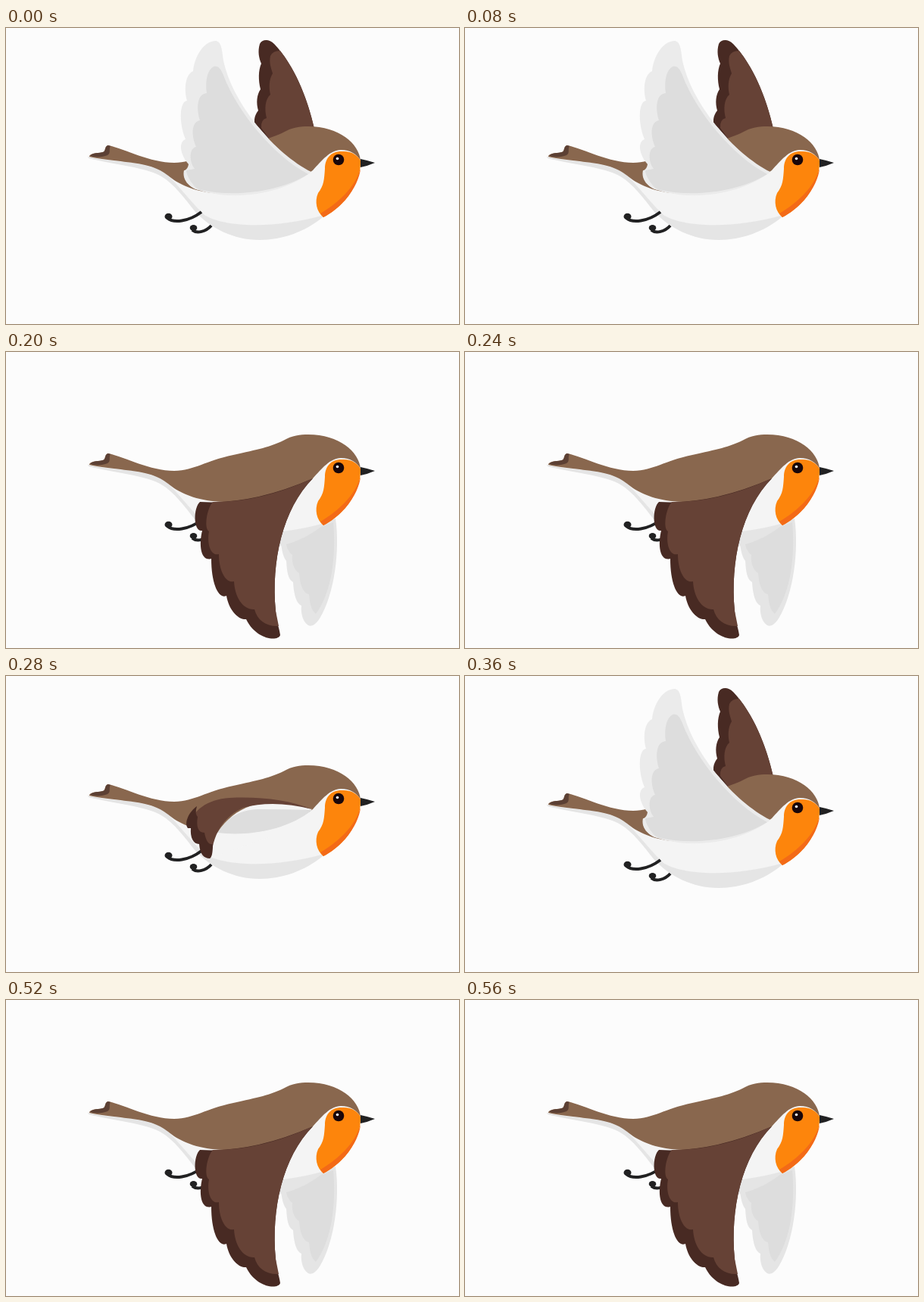
An HTML page with a canvas that plays this animation: 598x391 px, repeating every 600 ms.

```html
<!DOCTYPE html>
<html lang="en">
<head>
<meta charset="utf-8">
<title>Flying robin</title>
<style>
html, body { margin: 0; width: 100%; height: 100%; overflow: hidden; background: #fcfcfc; }
canvas { display: block; }
</style>
</head>
<body>
<canvas id="stage" width="598" height="391"></canvas>
<script>
const ctx = document.getElementById('stage').getContext('2d');

const color = {
  sky: '#fcfcfc', back: '#89674e', wing: '#664236', wingEdge: '#482a23',
  under: '#dddddd', underEdge: '#ebebeb', belly: '#f4f4f4', bellyShade: '#e5e5e5',
  breast: '#fd850c', breastShade: '#f36a17', ink: '#212122', eye: '#19060a'
};

const shape = (fill, d) => ({ fill, path: new Path2D(d) });

// Body parts, all relative to the highest point of the flight
const trunk = shape(color.bellyShade, `M108 149 C130 154 165 156 190 160 L300 170 L405 160
  L430 143 Q458 135 468 153 L468 165 C460 190 445 210 418 229 C395 248 365 259 335 259
  C300 259 270 243 250 222 C235 203 222 185 205 175 C185 163 140 159 109 151Z`);
const belly = shape(color.belly, `M200 162 C222 178 240 205 262 226 C285 241 350 246 420 226
  L470 180 L468 130 L300 150Z`);
const upper = [
  shape(color.back, `M110 148 C113 143 123 145 129 142.5 C132 140 130 135 135 134
    C158 139 190 157 222 157 C250 156 262 144 300 136 C332 129 350 125 366 117
    C378 110 388 109 399 109 C440 109 466 132 468 154 C463 146 455 140 442 140
    C428 140 417 154 405 167 C382 185 335 197 300 198 C262 199 240 191 222 180
    C206 168 200 162 170 157.5 C145 154 120 152 110 149Z`),
  shape('#5c4034', `M111 148 C114 143 123 145 129 142.5 C132 140 130 135 135 134 L138 135
    C135 139 139 144 134 147 C127 150 118 150 111 148Z`),
  shape(color.breast, `M421 165 C421 152 428 142 443 142 C456 141 464 147 468 154
    C469 172 460 192 448 206 C440 215 429 224 419 229 C410 222 407 208 412 197
    C420 187 420 178 421 165Z`),
  shape(color.breastShade, `M468 165 C460 190 440 209 415 224 L419 229
    C429 224 440 215 448 206 C460 192 467 176 468 165Z`),
  shape(color.ink, 'M468 152 Q478 154 487 157 Q478 161 468 163Z')
];
const legs = new Path2D('M213 230 C221 237 241 235 258 222 M246 246 C252 251 264 248 271 240');

const poses = {
  raised: {
    drop: 21,
    behind: [
      shape(color.wingEdge, `M407 133 C398 92 380 48 354 21 C347 14 338 15 335 21
        C332 31 334 40 337 47 C333 56 333 69 336 81 C331 88 330 99 333 109
        C327 117 328 122 328 125 L350 150Z`),
      shape(color.wing, `M407 133 C398 94 384 59 362 30 Q352 30 349 37 C347 46 350 53 352 60
        C347 68 347 79 349 88 C342 94 341 107 344 119 Q336 121 337 132 L350 150Z`)
    ],
    front: [
      shape(color.underEdge, `M403 190 C355 166 299 100 287 43 C285 27 284 17 276 17
        C261 18 249 37 247 57 C236 62 235 82 239 96 C229 97 228 125 237 147
        C228 150 229 166 241 180 Q240 186 236 188 C232 197 241 211 254 214
        C300 229 365 220 403 190Z`),
      shape(color.under, `M399 193 C353 169 306 111 288 65 C284 53 279 49 274 51
        C265 56 263 72 265 86 C252 87 251 106 256 122 C245 124 244 141 251 157
        C241 159 242 177 249 186 L238 188 C238 202 246 210 257 214
        C305 224 362 216 399 193Z`),
      shape(color.underEdge, 'M235 188 C232 200 242 211 254 214 Q242 204 237 188Z')
    ]
  },
  folding: {
    drop: 29.5,
    behind: [],
    front: [
      shape('#f0f0f0', `M240 189 C235 189 235 205 240 222 C252 245 275 251 302 251
        C333 250 351 244 369 231 L300 234 C272 228 250 213 244 194 Q242 189 240 189Z`),
      shape(color.under, `M239 223 C245 243 270 251 302 251 C330 250 348 244 365 234
        C330 239 290 239 262 230 Q250 225 253 235 Q245 232 239 223Z`),
      shape(color.wing, `M270 223 C315 226 362 219 405 197 C391 209 378 221 365 232
        C330 241 295 235 270 223Z`)
    ]
  },
  lowered: {
    drop: 0,
    behind: [
      shape(color.bellyShade, `M435 220 C441 260 434 320 414 352 C408 361 403 363 399 361
        C391 356 389 343 390 335 C384 333 380 322 379 304 C372 300 371 290 370 276
        C364 268 364 258 362 245Z`),
      shape(color.under, `M432 225 C436 270 430 318 409 346 C402 340 401 330 400 320
        C391 318 388 305 387 292 C379 288 377 275 378 268 Q370 262 369 248Z`)
    ],
    front: [
      shape(color.wingEdge, `M405 167 C365 208 350 276 356 342 C357 357 361 365 362 374
        C359 383 330 380 317 353 C306 354 294 340 291 322 C281 327 271 307 271 273
        C258 277 254 257 259 236 C247 238 247 206 256 198 Q325 202 405 167Z`),
      shape(color.wing, `M405 167 C365 208 350 276 356 342 L360 362 C344 363 332 355 328 340
        C313 341 302 324 301 303 C290 306 281 289 281 267 C270 270 265 253 268 237
        C261 233 265 207 273 198 Q335 199 405 167Z`)
    ]
  },
  rising: {
    drop: 9,
    behind: [],
    front: [
      shape(color.belly, 'M271 240 C272 200 305 170 345 167 Q378 167 404 176 L350 212Z'),
      shape(color.under, 'M279 207 C291 188 307 177 333 176 Q369 176 404 177 C371 204 319 212 279 207Z'),
      shape(color.wing, `M404 176 C373 163 333 159 295 161 C265 163 246 178 243 197
        L258 222 L271 238 C274 204 291 184 313 174 Q353 163 404 176Z`),
      shape(color.wingEdge, `M252 172 C241 180 235 194 240 201 L244 201 C243 213 247 222 255 222
        C256 235 261 241 269 241 Q273 239 273 222 Q265 224 262 207 C253 207 251 198 253 186
        Q249 182 252 172Z`)
    ]
  }
};

const wingbeat = [
  [0, 'raised'], [120, 'folding'], [200, 'lowered'], [280, 'rising'],
  [360, 'raised'], [440, 'folding'], [520, 'lowered']
];
const LOOP = 600;

function paint({ fill, path }) {
  ctx.fillStyle = fill;
  ctx.fill(path);
}

function ellipse(fill, x, y, rx, ry = rx) {
  ctx.fillStyle = fill;
  ctx.beginPath();
  ctx.ellipse(x, y, rx, ry, 0, 0, Math.PI * 2);
  ctx.fill();
}

function drawBody() {
  paint(trunk);
  ctx.save();
  ctx.clip(trunk.path);
  paint(belly);
  ctx.restore();
  upper.forEach(paint);
  ellipse(color.eye, 439, 153, 7.3);
  ellipse('#fff', 437.5, 151.5, 1.8);

  ctx.strokeStyle = color.ink;
  ctx.lineWidth = 4;
  ctx.stroke(legs);
  ellipse(color.ink, 214.5, 228, 5, 4.3);
  ellipse(color.ink, 247.5, 243, 4.8, 4);
}

function draw(time) {
  const pose = poses[wingbeat.findLast(([start]) => time >= start)[1]];
  ctx.fillStyle = color.sky;
  ctx.fillRect(0, 0, 598, 391);
  pose.behind.forEach(paint);
  ctx.save();
  ctx.translate(0, pose.drop);
  drawBody();
  ctx.restore();
  pose.front.forEach(paint);
}

const begin = performance.now();
function tick() {
  draw((performance.now() - begin) % LOOP);
  requestAnimationFrame(tick);
}
tick();
</script>
</body>
</html>
```
